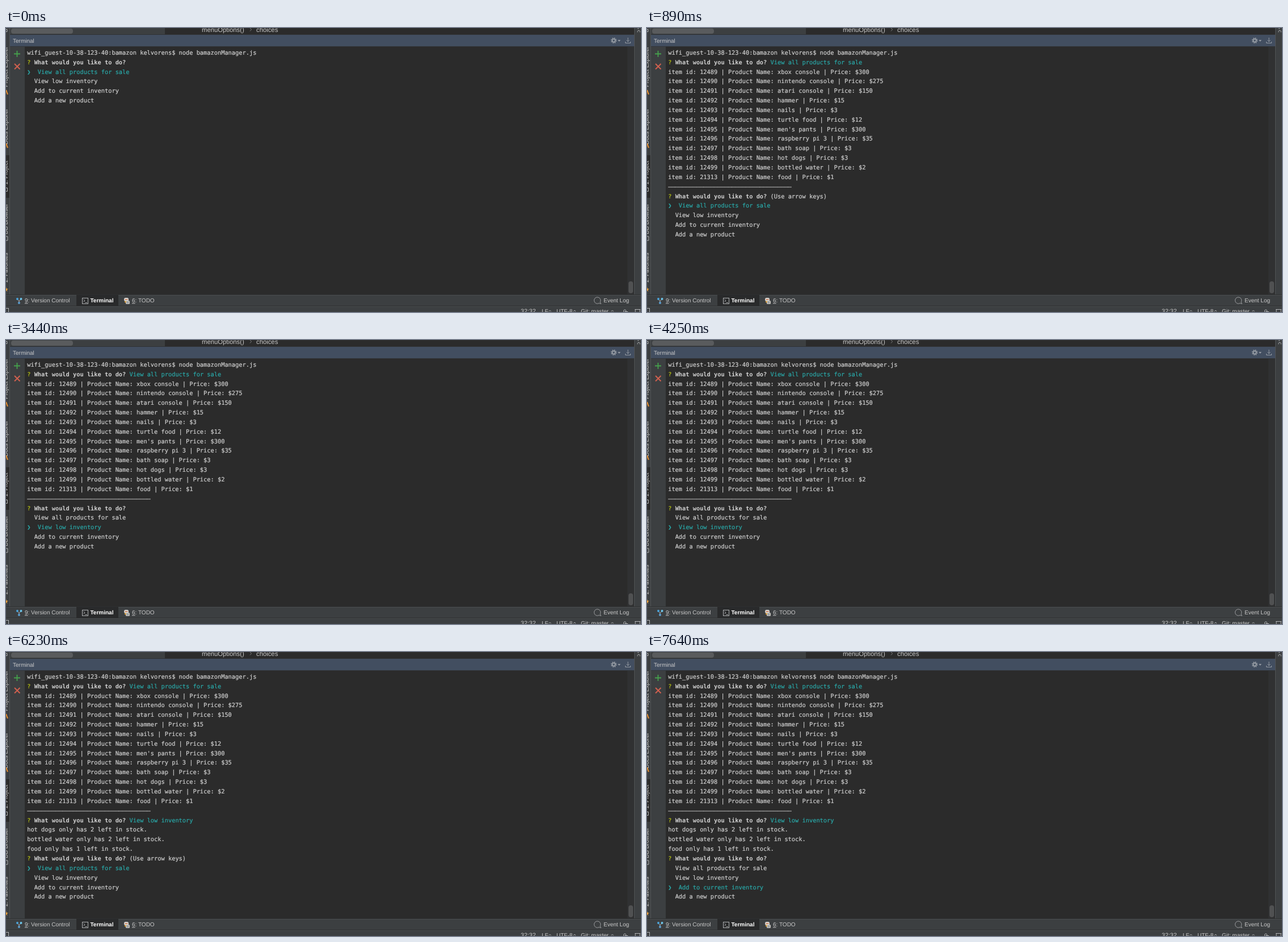
Recreate the animation shown at these times as an HTML page. Size 1119x500 px, loop 8000 ms.

```html
<!DOCTYPE html>
<html lang="en">
<head>
<meta charset="utf-8">
<title>Terminal</title>
<style>
  html, body { margin: 0; width: 100%; height: 100%; overflow: hidden; background: #3c3f41; }
  svg { display: block; width: 1119px; height: 500px; }
  text { font: 10px "Liberation Sans", Arial, sans-serif; fill: #c8c8c8; white-space: pre; text-rendering: geometricPrecision; }
  .crumb text { font-size: 11.3px; }
  #screen text { font: 10.33px "DejaVu Sans Mono", monospace; fill: #d0d0d0; stroke: #d0d0d0; stroke-width: .2px; }
  #screen .bold { font-weight: bold; stroke: none; }
  #screen .cyan { fill: #2aa8a8; stroke: #2aa8a8; }
  #screen .mark { fill: #a9b414; font-weight: bold; stroke: none; }
  .key { text-decoration: underline; }
  .line { fill: none; stroke: #afb1b3; }
  .dim { fill: none; stroke: #959ba3; }
</style>
</head>
<body>
<svg viewBox="0 0 1119 500">
  <!-- window panels -->
  <rect width="1119" height="500" fill="#3c3f41"/>
  <rect x="280" width="828" height="11" fill="#2b2b2b"/>
  <rect x="9" y="1" width="109" height="9" rx="4" fill="#595b5d"/>
  <rect x="6" y="11" width="1102" height="1" fill="#2f3133"/>
  <rect x="7" y="12" width="1101" height="20" fill="#424e60"/>
  <rect x="7" y="32" width="1101" height="1" fill="#33373c"/>
  <rect x="33" y="33" width="1062" height="436" fill="#2b2b2b"/>
  <rect x="1095" y="33" width="12" height="436" fill="#303132"/>
  <rect x="1097" y="446" width="8" height="21" rx="4" fill="#505152"/>
  <rect y="224" width="6" height="75" fill="#2b2b2b"/>
  <path d="M6.5 0V469M1107.5 0V469" stroke="#505355"/>
  <path d="M0 469.5H1119M0 489.5H1119" stroke="#2d2f30"/>
  <path d="M0 470.5H1119M0 490.5H1119" stroke="#4a4d4f"/>
  <rect x="124" y="470" width="74" height="19" fill="#292a2b"/>

  <g class="crumb">
    <text x="345" y="6.500">menuOptions()</text>
    <text x="441" y="6.500">choices</text>
    <path class="line" d="M430 0l2.500 2.500-2.500 3" stroke-opacity=".6"/>
  </g>
  <text x="12" y="25.600">Terminal</text>

  <!-- header and toolbar icons -->
  <circle class="dim" cx="1071" cy="22" r="2.700" stroke-width="2"/>
  <circle class="dim" cx="1071" cy="22" r="4.500" stroke-width="1.400" stroke-dasharray="1.770"/>
  <path d="M1078 21h5l-2.500 3z" fill="#959ba3"/>
  <path class="dim" d="M1096 17v7m-2.500-2.500l2.500 2.500 2.500-2.500M1091.500 24v2.500h9V24"/>
  <path d="M14 45.500h11M19.500 40v11" stroke="#45a04c" stroke-width="1.800"/>
  <path d="M15 63l9.500 9.500M24.500 63l-9.500 9.500" stroke="#d0604f" stroke-width="2"/>

  <!-- side tabs, cut off by the stage edge -->
  <g id="tabs"></g>
  <path class="line" d="M0 109l3 8M0 203l3 8" style="stroke:#e89030;stroke-width:2"/>
  <path class="line" d="M0 281.500h2.500v6H0M0 367h3v7H0"/>
  <path d="M0 456l1 3h3l-2.500 2 1 3L0 462z" fill="#f0a33a"/>
  <path class="line" d="M0 2.500h2v4H0"/>
  <path class="line" d="M1114 0v2M1113 7.500a2.200 2.200 0 1 1 4 0"/>

  <!-- bottom bar -->
  <path class="line" d="M19.500 477l3.500 4 3.500-4M23 481v3"/>
  <circle cx="20" cy="477" r="2" fill="#4aa3d8"/>
  <circle cx="26.500" cy="477" r="2" fill="#6cc4e8"/>
  <circle cx="23" cy="484" r="2" fill="#5a9fd0"/>
  <text x="33" y="483.300"><tspan class="key">9</tspan>: Version Control</text>
  <rect class="line" x="134.500" y="475.500" width="10" height="10"/>
  <path class="line" d="M136.500 478l2.500 2.200-2.500 2.300M139.500 483.500h3.500"/>
  <text x="148.500" y="483.300" style="fill:#fff;font-weight:bold">Terminal</text>
  <rect x="208" y="475" width="8" height="6" rx="2.500" fill="#d8d6d2"/>
  <path d="M209.500 478h5" stroke="#c96a3d" stroke-width="1.300"/>
  <rect x="211" y="480" width="7" height="6" rx="1.500" fill="#c9c6c0"/>
  <path d="M212.500 482h4M212.500 484h4" stroke="#6d7d8a"/>
  <circle cx="210.500" cy="482" r="1.500" fill="#e0a33e"/>
  <text x="222" y="483.300"><tspan class="key">6</tspan>: TODO</text>
  <path class="line" d="M1045 484.500a5.700 5.700 0 1 1 2-2l1.500 3z" stroke-opacity=".8"/>
  <text x="1053" y="483.300">Event Log</text>

  <!-- status bar -->
  <rect class="line" x="-1" y="493.500" width="5.500" height="9"/>
  <text x="907" y="502.300" style="font-size:10.7px">32:32</text>
  <text x="944" y="502.300">LF</text>
  <text x="970" y="502.300">UTF-8</text>
  <text x="1013" y="502.300">Git: master</text>
  <path class="line" d="M956.500 499l2-2 2 2M1000 499l2-2 2 2M1066.500 499l2-2 2 2"/>
  <path class="line" d="M1088.500 500v-2a2 2 0 0 1 4 0v2M1090 499.500h6"/>
  <path class="line" d="M1109 500v-4.500h8v4.500M1108 495.500h10"/>

  <g id="screen"></g>
</svg>
<script>
const LOOP = 8000, LEFT = 37.2, COLUMN = 6.219, TOP = 46.8, ROW = 16.85;
const screen = document.getElementById("screen");
const tabs = document.getElementById("tabs");

function add(parent, tag, attrs, content = "") {
  const node = document.createElementNS("http://www.w3.org/2000/svg", tag);
  for (const name in attrs) node.setAttribute(name, attrs[name]);
  node.textContent = content;
  parent.append(node);
}

for (const [label, y] of [["Project Explorer", 104], ["Docs Explorer", 205],
    ["1: Project", 276], ["DB Browser", 363], ["2: Favorites", 448]])
  add(tabs, "text", { transform: `translate(2.7 ${y}) rotate(-90)` }, label);

// A line is a list of [column, text, class] parts.
const plain = text => [[0, text, ""]];
const choices = ["View all products for sale", "View low inventory",
  "Add to current inventory", "Add a new product"];
const ask = (answer = "", style = "cyan") =>
  [[0, "?", "mark"], [2, "What would you like to do?", "bold"], [29, answer, style]];
const menu = (selected, hint) => [
  ask(hint, ""),
  ...choices.map((choice, i) => i === selected
    ? [[0, "❯", "cyan"], [3, choice, "cyan"]]
    : [[2, choice, ""]])
];

const products = [
  [12489, "xbox console", 300], [12490, "nintendo console", 275],
  [12491, "atari console", 150], [12492, "hammer", 15], [12493, "nails", 3],
  [12494, "turtle food", 12], [12495, "men's pants", 300],
  [12496, "raspberry pi 3", 35], [12497, "bath soap", 3], [12498, "hot dogs", 3],
  [12499, "bottled water", 2], [21313, "food", 1]
].map(([id, name, price]) => plain(`item id: ${id} | Product Name: ${name} | Price: $${price}`));

const stock = [["hot dogs", 2], ["bottled water", 2], ["food", 1]]
  .map(([name, count]) => plain(`${name} only has ${count} left in stock.`));

const command = plain("wifi_guest-10-38-123-40:bamazon kelvorens$ node bamazonManager.js");
const hint = "(Use arrow keys)";
const chosen = [command, ask(choices[0])];
const listed = [...chosen, ...products, plain("—".repeat(35))];
const checked = [...listed, ask(choices[1]), ...stock];

const steps = [
  [0, [command, ...menu(0)]],
  [740, [...chosen, "cursor"]],
  [890, [...listed, ...menu(0, hint)]],
  [3440, [...listed, ...menu(1)]],
  [4790, [...checked, ...menu(0, hint)]],
  [7190, [...checked, ...menu(1)]],
  [7640, [...checked, ...menu(2)]]
];

function show(lines) {
  screen.replaceChildren();
  lines.forEach((line, row) => {
    const y = TOP + row * ROW;
    if (line === "cursor")
      return add(screen, "rect", { x: 37, y: y - 14, width: 6.5, height: 16.5, fill: "#bbb" });
    for (const [column, text, style] of line)
      if (text) add(screen, "text", { x: LEFT + column * COLUMN, y, class: style }, text);
  });
}

const start = performance.now();
let current;
function tick() {
  const time = (performance.now() - start) % LOOP;
  const step = steps.findLast(([from]) => from <= time);
  if (step !== current) show((current = step)[1]);
  requestAnimationFrame(tick);
}
tick();
</script>
</body>
</html>
```
